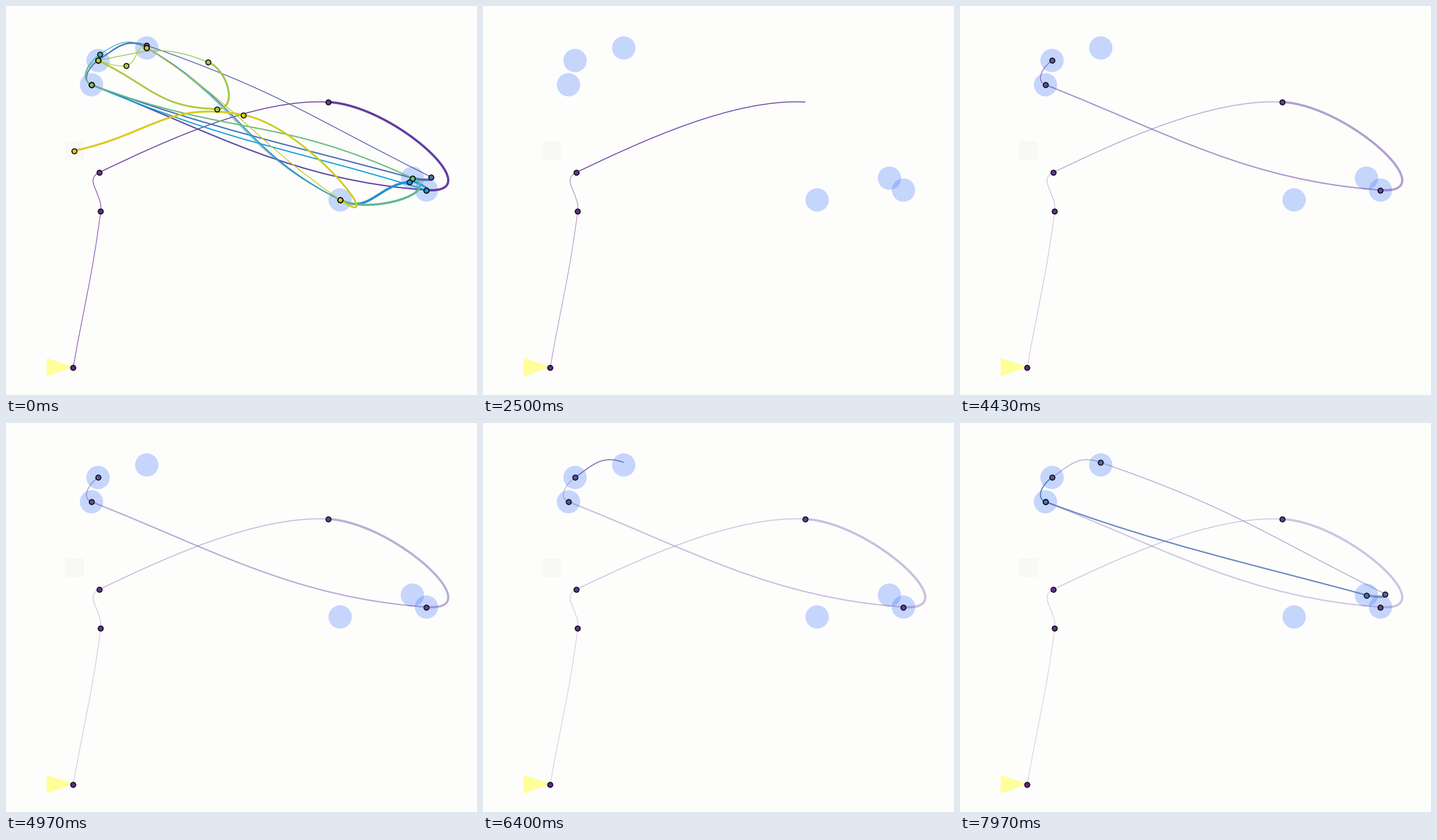
A matplotlib script for the animation above (8 s loop, 788 by 652 pixels).

```python
import matplotlib.pyplot as plt
import numpy as np
from matplotlib.animation import FuncAnimation
from matplotlib.colors import LinearSegmentedColormap
from matplotlib.patches import Circle, PathPatch, Polygon, Rectangle
from matplotlib.path import Path

W, H, DPI = 788, 652, 100
FRAMES, INTERVAL = 200, 40
OVERVIEW_END = 1400
FADE, FAINT = 1300, 0.28
PX = 72 / DPI
LATER = np.inf

fig = plt.figure(figsize=(W / DPI, H / DPI), dpi=DPI, facecolor="#fdfdfc")
ax = fig.add_axes([0, 0, 1, 1])
ax.set_xlim(0, W)
ax.set_ylim(H, 0)
ax.axis("off")

# Places visited by the trail
START, BEND, TURN, CREST = (112.5, 605.5), (158.5, 344), (156, 279), (539.5, 161)
EAST, EAST_UP, EAST_TIP, EAST_IN = (703.5, 308.5), (680, 288.5), (711, 286.5), (675.5, 294.5)
WEST, HUB, HUB_UP = (143, 132), (154, 91.3), (157, 81)
NORTH, NORTH_B, SOUTH = (235.5, 66), (235.5, 70.3), (559, 325)
TOP, MID, SMALL, GATE, GOAL = (338.5, 94.3), (353, 172.5), (201.5, 99.8), (397, 182.5), (114.5, 242.5)

# Background zones
ax.add_patch(Rectangle((99, 227), 31, 31, fc="#f8f8f4", lw=0))
ax.add_patch(Polygon([(68, 590), (68, 621), (113, 605)], fc="#ffff99", lw=0))
for place in (HUB, NORTH_B, WEST, SOUTH, EAST_UP, EAST):
    ax.add_patch(Circle(place, 19.5, fc=(0.2, 0.42, 1, 0.27), lw=0))

trail_color = LinearSegmentedColormap.from_list(
    "trail", ["#682490", "#5566b0", "#12a0dc", "#9cc850", "#e2cc10"])

stops = []


def stop(place, width, arrive=LATER, depart=None, bow=0.45):
    """A place on the trail: dot at arrival, outgoing line at departure."""
    stops.append((np.array(place), width, arrive, depart or arrive, bow))


stop(START, 0.9, 1430)
stop(BEND, 1, 1500)
stop(TURN, 1.5, 2400, bow=0.3)
stop(CREST, 3.8, 2720, bow=0.5)
stop(EAST, 2.2, 3100, bow=0.38)
stop(WEST, 1.5, 3600)
stop(HUB, 1.5, 4250, depart=6250)
stop(NORTH, 1.4, 6500)
stop(EAST_TIP, 4, 6980)
stop(EAST_UP, 2.2, 7640, bow=0.36)
stop(WEST, 1.7, 7860)
stop(HUB, 1.8)
stop(NORTH_B, 2)
stop(SOUTH, 4)
stop(EAST_IN, 3)
stop(EAST, 2)
stop(WEST, 1.3)
stop(HUB_UP, 1.2)
stop(NORTH_B, 1.3)
stop(SOUTH, 3.6)
stop(EAST_UP, 2.2)
stop(WEST, 1.3)
stop(HUB, 1.4)
stop(TOP, 3.2)
stop(MID, 3)
stop(HUB, 1.3)
stop(SMALL, 1.3)
stop(NORTH_B, 1.4)
stop(SOUTH, 3, bow=0.5)
stop(GATE, 3.2)
stop(GOAL, 0)

points = np.array([s[0] for s in stops])
padded = np.vstack([points[:1], points, points[-1:]])
heading = padded[2:] - padded[:-2]
heading /= np.hypot(*heading.T)[:, None]

dots, lines = [], []
for i, (place, width, arrive, depart, bow) in enumerate(stops):
    color = trail_color(i / (len(stops) - 1))
    mark, = ax.plot(*place, "o", ms=8.4 * PX, mfc=color, mec="#101010",
                    mew=1.7 * PX, zorder=5 + i / 100)
    dots.append((mark, arrive))
    if i + 1 < len(stops):
        end = points[i + 1]
        reach = bow * np.hypot(*(end - place))
        curve = Path([place, place + reach * heading[i], end - reach * heading[i + 1], end],
                     [Path.MOVETO] + [Path.CURVE4] * 3)
        line = ax.add_patch(PathPatch(curve, fc="none", ec=color, lw=width * PX,
                                      capstyle="butt", zorder=3 + i / 100))
        lines.append((line, depart))


def draw(frame):
    now = frame * INTERVAL
    overview = now < OVERVIEW_END
    for mark, arrive in dots:
        mark.set_visible(overview or now >= arrive)
    for line, depart in lines:
        shown = overview or now >= depart
        line.set_visible(shown)
        if shown:
            line.set_alpha(1 if overview else
                           FAINT + (1 - FAINT) * np.exp((depart - now) / FADE))
    return []


anim = FuncAnimation(fig, draw, frames=FRAMES, interval=INTERVAL, repeat=True,
                     repeat_delay=0, blit=False)
plt.show()
```
